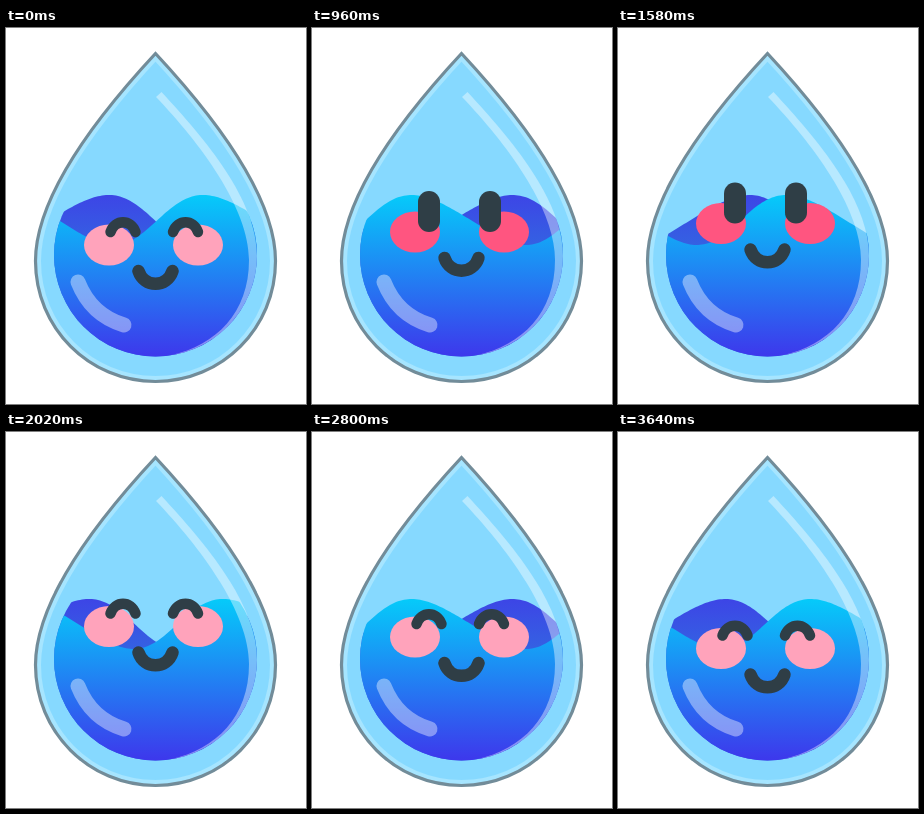
Write an HTML page that moves like this. It is 300 px wide and 376 px high and loops after 3680 ms.

```html
<!DOCTYPE html>
<html lang="en">
<head>
<meta charset="utf-8">
<title>Happy water drop</title>
<style>
html, body { margin: 0; width: 100%; height: 100%; overflow: hidden; background: #fff; }
svg { display: block; width: 100vw; height: 100vh; }
</style>
</head>
<body>
<svg viewBox="0 0 300 376">
  <defs>
    <linearGradient id="water" gradientUnits="userSpaceOnUse" x1="0" y1="163" x2="0" y2="328">
      <stop offset="0" stop-color="#04cefa"/>
      <stop offset="1" stop-color="#3d38ec"/>
    </linearGradient>
    <linearGradient id="deep" gradientUnits="userSpaceOnUse" x1="0" y1="165" x2="0" y2="220">
      <stop offset="0" stop-color="#3d44e6"/>
      <stop offset="1" stop-color="#3463e2"/>
    </linearGradient>
    <clipPath id="bowl"><circle cx="149.5" cy="227" r="101.5"/></clipPath>
    <path id="drop" d="M149.500 25.500C110 68 29.500 160 29.500 233C29.500 300 83 353.500 149.500 353.500S269.500 300 269.500 233C269.500 160 189 68 149.500 25.500Z"/>
    <clipPath id="glass"><use href="#drop"/></clipPath>
  </defs>

  <use href="#drop" fill="#86d9ff"/>
  <use href="#drop" fill="none" stroke="#a6e5ff" stroke-width="11" clip-path="url(#glass)"/>
  <use href="#drop" fill="none" stroke="#728c99" stroke-width="3.2"/>

  <g clip-path="url(#bowl)">
    <path id="back" fill="url(#deep)"/>
    <path id="front" fill="url(#water)"/>
  </g>

  <path fill="#fff" fill-opacity=".4" d="M150 69L155.500 64C200 112 251 172 251 228A101.500 101.500 0 0 1 165 327.300C210 317 243 285 243 232C243 180 194 115 150 69Z"/>
  <path fill="none" stroke="#fff" stroke-opacity=".4" stroke-width="15" stroke-linecap="round" d="M72 254Q85 287 118 297"/>

  <g id="face">
    <g id="cheeks">
      <ellipse cx="103" cy="217" rx="25" ry="20.500"/>
      <ellipse cx="192" cy="217" rx="25" ry="20.500"/>
    </g>
    <g id="open" fill="#2f3e46">
      <rect x="106" y="176" width="22" height="41" rx="11"/>
      <rect x="167" y="176" width="22" height="41" rx="11"/>
    </g>
    <g fill="none" stroke="#2f3e46" stroke-linecap="round">
      <path id="closed" stroke-width="10.500" d="M104.500 204C109 191 125 191 129.500 204M167 204C171.500 191 187.500 191 192 204"/>
      <path stroke-width="12.500" d="M132.500 243C138 260 161 260 166.500 243"/>
    </g>
  </g>
</svg>
<script>
const LOOP = 3680, HALF = LOOP / 2;
const WAVE = 204, MID = 192, AMP = 25, LEAN = 0.2, RISE = 25;
const el = id => document.getElementById(id);
const [back, front, face, cheeks, open, closed] =
  ['back', 'front', 'face', 'cheeks', 'open', 'closed'].map(el);

// Each crest is fuller on the side it travels towards (dir = 1 right, -1 left)
function wave(crest, dir) {
  let d = 'M40 335';
  for (let x = 40; x <= 260; x += 2) {
    const a = dir * (x - crest) / WAVE * 2 * Math.PI;
    const y = MID - AMP * Math.cos(a + LEAN * (Math.cos(a) - 1));
    d += `L${x} ${y.toFixed(2)}`;
  }
  return d + 'L260 335Z';
}

function draw(ms) {
  const t = ms % LOOP;
  const shift = t / HALF * WAVE;
  front.setAttribute('d', wave(197 + shift, 1));
  back.setAttribute('d', wave(103 - shift, -1));

  const lift = RISE * (1 - Math.abs(t - HALF) / HALF);
  face.setAttribute('transform', `translate(0 ${-lift.toFixed(2)})`);

  // Eyes open on the way up, smiling shut on the way down
  const awake = t >= 20 && t < HALF;
  open.style.display = awake ? '' : 'none';
  closed.style.display = awake ? 'none' : '';
  cheeks.setAttribute('fill', awake ? '#ff5580' : '#ffa3bb');
}

const start = performance.now();
function tick() {
  draw(performance.now() - start);
  requestAnimationFrame(tick);
}
draw(0);
tick();
</script>
</body>
</html>
```
